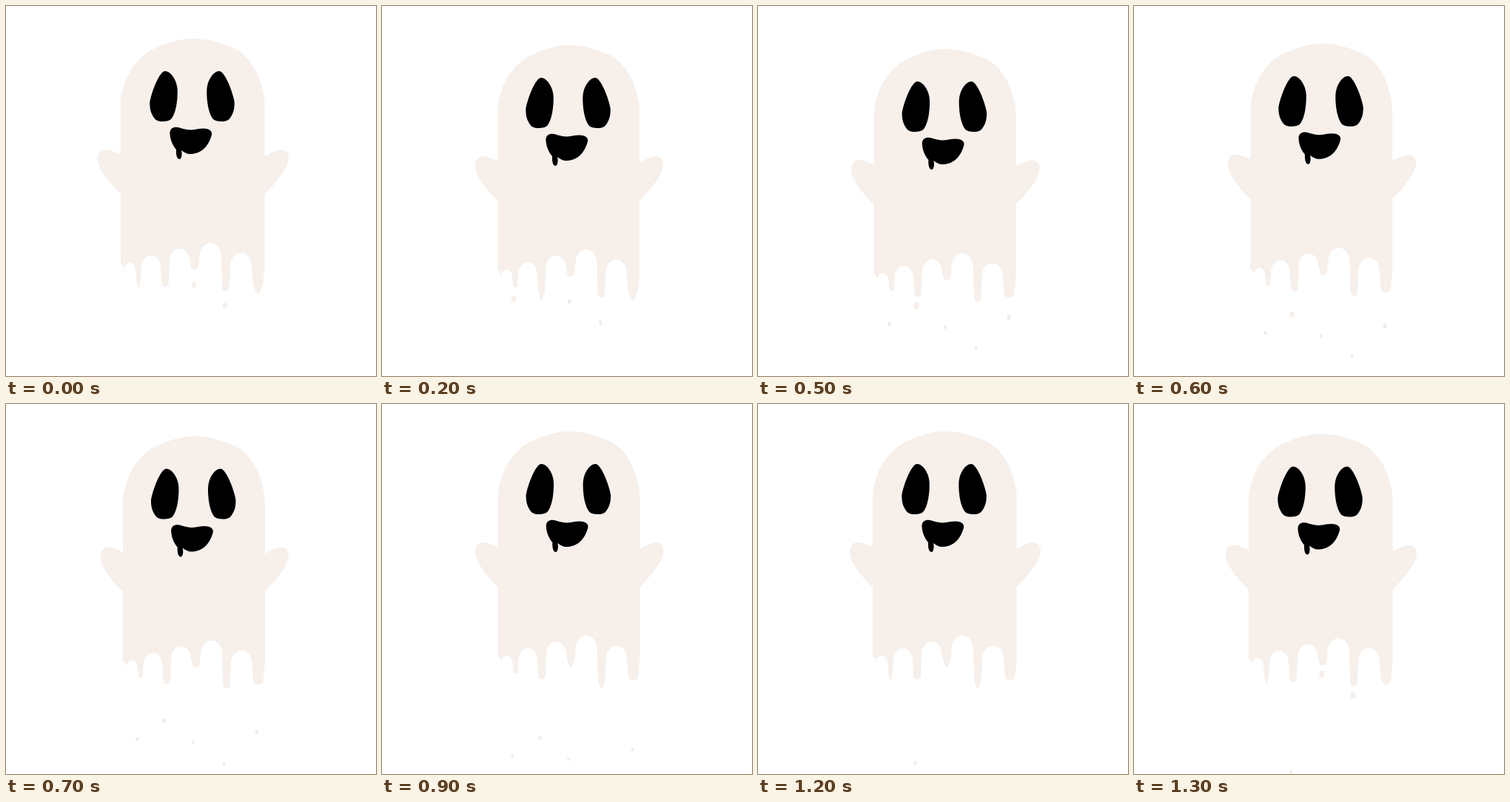
Write an HTML page with a canvas that moves like this. It is 500 by 500 pixels and loops after 1400 ms.

```html
<!DOCTYPE html>
<html lang="en">
<head>
<meta charset="utf-8">
<title>Dripping ghost</title>
<style>
  html, body { margin: 0; width: 100%; height: 100%; overflow: hidden; background: #fff; }
  canvas { display: block; width: 100vmin; height: 100vmin; }
</style>
</head>
<body>
<canvas width="500" height="500"></canvas>
<script>
const ctx = document.querySelector('canvas').getContext('2d');
const LOOP = 1400, STEP = 100, FALL_SPEED = .115;
const SKIN = '#f6efea', FALLING = '#f0eeec';

const since = (t, start) => (t - start + LOOP) % LOOP;

// Height of the body: linear moves between a few turning points
const poses = [[0, 0], [200, 9], [500, 14], [700, -.5], [1100, -13.5], [1200, -7], [LOOP, 0]];
function bob(t) {
  const i = poses.findIndex(p => p[0] > t);
  const [t0, y0] = poses[i - 1], [t1, y1] = poses[i];
  return y0 + (y1 - y0) * (t - t0) / (t1 - t0);
}
const sway = t => 1.7 * Math.max(0, 1 - Math.abs(t - 700) / 250);
const squeeze = t => 1 - Math.min(.015, .04 * Math.max(0, Math.sin(Math.PI * t / 1100)));

// Right to left: centre, half width, resting tip, top of the arch to its left, release time
const drips = [
  { x: 340.5, half: 8.5, rest: 380, top: 333.5, release: 350 },
  { x: 297, half: 6, rest: 385, top: 320, release: 1300 },
  { x: 255, half: 6.5, rest: 356.5, top: 328, release: 1300 },
  { x: 215, half: 6, rest: 379, top: 337, release: 500 },
  { x: 179, half: 4, rest: 371, top: 347, release: 150 }
];

function hem({ x, half, rest, top, release }, i, t) {
  // Each drip swells and pulls back during the half second before it lets go
  const wait = since(release, t);
  const stretch = wait < 500 ? 11 * Math.sin(Math.PI * wait / 500) : 0;
  const tip = rest + stretch, w = half * .82, round = Math.max(1.3, w * .65 - stretch);
  const next = drips[i + 1];
  const start = x - half, end = next ? next.x + next.half : 159;
  const rise = (start - end) * .62, spring = top + rise;
  return `L${x + w} ${rest - 8}
    C${x + w} ${rest - 2} ${x + round} ${tip} ${x} ${tip}
    C${x - round} ${tip} ${x - w} ${rest - 2} ${x - w} ${rest - 8}
    L${start} ${spring} A${(start - end) / 2} ${rise} 0 0 0 ${end} ${spring}`;
}

function body(t) {
  return new Path2D(`M155 349 V254
    C143 243 124 222 124 207 C124 194 134 192 143 195.5 Q150 198 155 201 V130
    C158 98 175 68 204 56 C222 48 238 44 252 44
    C272 44 292 50 310 58 C334 70 347 102 349.5 130 V203
    C361 196 371 192 378 196 C386 203 381 216 373 227 Q363 241 349.5 254 V352
    ${drips.map((d, i) => hem(d, i, t)).join(' ')}
    L158 350 Z`);
}

const eye = new Path2D(`M215 88 C222 88 231 99 231.7 114 C232 130 229 146 223 153
  C219 157 206 157 202 153.5 C196 147 194 139 194.3 130 C196 118 207 88 215 88 Z`);
const mouth = new Path2D(`M221.4 171 C222 164 229 162 236 165 C245 168 252 168 260 166
  C271 164 279.5 167 278 174 C275 185 268 199 250 200 C245 200.5 241 198 237 195
  C238.5 201 237 207 234.5 207 C231 207 229.5 201 230 194 C225 188 221.5 180 221.4 171 Z`);

function drawDrop({ x, rest, release }, t) {
  const age = since(t, release);
  const y = rest + bob(release) + 12 + FALL_SPEED * age;
  const r = 1.9 + 1.7 * Math.exp(-age / 200);
  ctx.fillStyle = age < 150 ? SKIN : FALLING;
  ctx.beginPath();
  ctx.ellipse(x - 1 - age * .002, y, r, r * 1.4, 0, 0, Math.PI * 2);
  ctx.fill();
}

function draw(now) {
  const t = Math.floor(now % LOOP / STEP) * STEP;
  ctx.clearRect(0, 0, 500, 500);
  drips.forEach(d => drawDrop(d, t));
  ctx.save();
  ctx.translate(sway(t), bob(t));

  ctx.save();
  ctx.translate(252, 0);
  ctx.scale(squeeze(t), 1);
  ctx.translate(-252, 0);
  ctx.fillStyle = SKIN;
  ctx.fill(body(t));
  ctx.restore();

  ctx.fillStyle = '#000';
  ctx.fill(mouth);
  ctx.fill(eye);
  ctx.translate(503, 0);
  ctx.scale(-1, 1);
  ctx.fill(eye);
  ctx.restore();
}

const begin = performance.now();
function loop() {
  draw(performance.now() - begin);
  requestAnimationFrame(loop);
}
loop();
</script>
</body>
</html>
```
